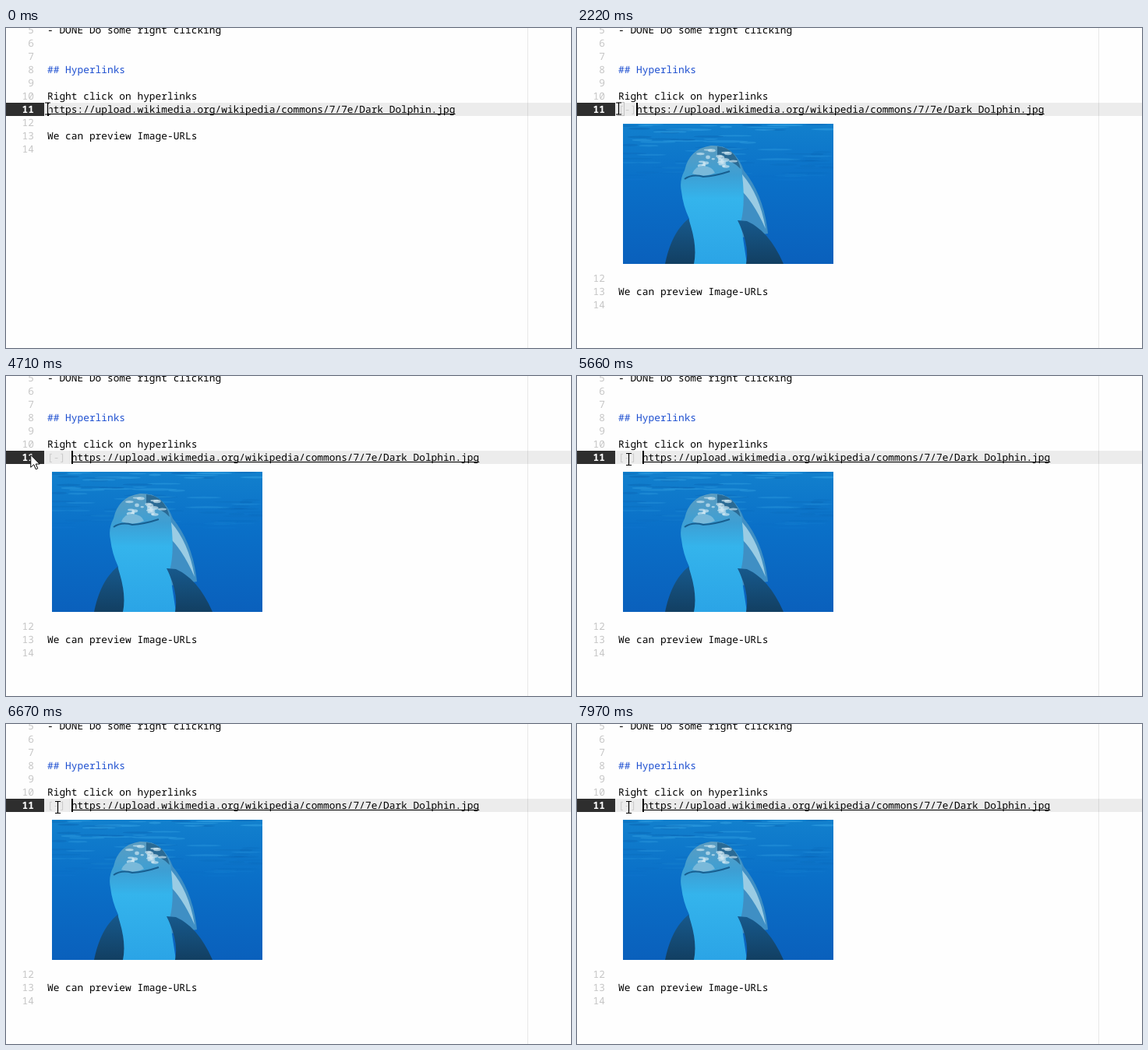
Recreate the animation shown at these times as an HTML page. Size 725x411 px, loop 8000 ms.

```html
<!DOCTYPE html>
<html lang="en">
<head>
<meta charset="utf-8">
<title>Image link preview</title>
<style>
  html, body { margin: 0; width: 100%; height: 100%; overflow: hidden; background: #fefefe; }
  svg { display: block; width: 725px; height: 411px; }
  text {
    font: 12.83px "Noto Sans Mono", "DejaVu Sans Mono", monospace;
    text-rendering: geometricPrecision; white-space: pre; fill: #000;
  }
  .num { fill: #c6c6c6; text-anchor: end; }
  .now { fill: #fff; font-weight: bold; }
  .head { fill: #1d4fd0; }
</style>
</head>
<body>
<svg viewBox="0 0 725 411">
  <defs>
    <linearGradient id="sea" x2="0" y2="1">
      <stop offset="0" stop-color="#1280cd"/>
      <stop offset=".4" stop-color="#0a70c8"/>
      <stop offset="1" stop-color="#0a60bc"/>
    </linearGradient>
    <linearGradient id="skin" x2="0" y2="1">
      <stop offset="0" stop-color="#5c9cc0"/>
      <stop offset=".25" stop-color="#3d9fd4"/>
      <stop offset=".45" stop-color="#34b4ec"/>
      <stop offset="1" stop-color="#2ba4e6"/>
    </linearGradient>
    <linearGradient id="fin" x2="0" y2="1">
      <stop offset="0" stop-color="#17598c"/>
      <stop offset="1" stop-color="#123f62"/>
    </linearGradient>
    <clipPath id="frame"><rect x="59" y="123" width="270" height="180"/></clipPath>
  </defs>

  <rect x="669" width="1" height="411" fill="#e8e8e8"/>
  <rect x="49" y="96" width="676" height="17" fill-opacity=".07"/>
  <rect y="96" width="49" height="17" fill="#2e2e2e"/>

  <g id="top"></g>
  <g id="below"></g>

  <text id="prefix" x="53" y="109"></text>
  <g id="link">
    <text x="53" y="109">https://upload.wikimedia.org/wikipedia/commons/7/7e/Dark_Dolphin.jpg</text>
    <rect x="53" y="110" width="523.5" height="1"/>
  </g>
  <rect id="match" x="52.5" y="95.5" width="8" height="17" fill="none" stroke="#c0c0c0"/>
  <rect id="caret" y="96" width="2" height="17"/>

  <g id="photo" clip-path="url(#frame)">
    <rect x="59" y="123" width="270" height="180" fill="url(#sea)"/>
    <g id="waves"></g>
    <path d="M186 152Q206 160 214 183Q240 215 245 264L205 270Z" fill="#3f8fc4"/>
    <path d="M212 188Q235 215 242 258Q226 222 208 206Z" fill="#9accE4"/>
    <path d="M134 210Q131 196 138 183Q144 155 172 151Q202 150 211 180Q217 225 210 250L218 303H148L144 245Q136 228 134 210Z" fill="url(#skin)"/>
    <path d="M180 152Q204 154 210 181Q200 170 180 166Z" fill="#2a6a94"/>
    <g id="glints"></g>
    <path d="M148 187Q152 177 162 177Q174 178 177 186Q162 193 148 187Z" fill="#79b9da"/>
    <path d="M138 194Q148 187 162 191Q178 190 196 184" fill="none" stroke="#185f90" stroke-width="2"/>
    <path d="M143 245Q121 263 113 303H150Q155 279 143 245Z" fill="url(#fin)"/>
    <path d="M206 247Q222 279 217 303H265Q247 261 218 248Z" fill="url(#fin)"/>
  </g>

  <g id="mouse">
    <path id="arrow" d="M0 0V16L4 12.5L6.5 18.5L9 17.5L6.5 11.8H11.5Z" fill="#fff" stroke="#000"/>
    <g id="beam" fill="none">
      <path d="M0-6V6" stroke="#eee" stroke-width="4"/>
      <path d="M-3.5-7.5H3.5M0-7V7M-3.5 7.5H3.5" stroke="#000" stroke-width="1.2"/>
    </g>
  </g>
</svg>
<script>
const $ = id => document.getElementById(id);
const LOOP = 8000, CHAR = 7.698, LEFT = 53;
const TYPED = "[-] ";
const keys = [980, 1610, 2220, 2620];
const clicks = [5810, 6670, 7280, 7970];
const BLINK = 1005, LIT = 613;

const lines = {
  5: "- DONE Do some right clicking",
  8: "## Hyperlinks",
  10: "Right click on hyperlinks",
  13: "We can preview Image-URLs"
};

function addText(parent, x, y, str, cls) {
  const el = document.createElementNS("http://www.w3.org/2000/svg", "text");
  el.setAttribute("x", x);
  el.setAttribute("y", y);
  el.setAttribute("class", cls);
  el.textContent = str;
  parent.append(el);
}

for (let n = 5; n <= 14; n++) {
  const group = n > 11 ? $("below") : $("top"), y = 109 + 17 * (n - 11);
  addText(group, 36, y, n, n === 11 ? "num now" : "num");
  if (lines[n]) addText(group, LEFT, y, lines[n], n === 8 ? "head" : "");
}

let seed = 7;
const rand = () => (seed = seed * 16807 % 2147483647) / 2147483647;
const blob = (x, y, rx, ry, fill, alpha) =>
  `<ellipse cx="${x}" cy="${y}" rx="${rx}" ry="${ry}" fill="${fill}" opacity="${alpha}"/>`;

// Flat light and dark ripples, fading with depth
let waves = "", glints = "";
for (let i = 0; i < 90; i++) {
  const depth = rand() ** 1.5;
  waves += blob(59 + 270 * rand(), 124 + 75 * depth, 8 + 22 * rand(), .6 + rand(),
    i % 2 ? "#3aa8e6" : "#0860ae", .5 * (1 - depth));
}
// Sunlight on the forehead
for (let i = 0; i < 22; i++) {
  const a = Math.PI * (1.1 + .8 * rand()), r = .4 + .5 * rand();
  glints += blob(175 + 34 * r * Math.cos(a), 183 + 32 * r * Math.sin(a), 2 + 4 * rand(), 1 + 2 * rand(), "#d6ebf4", .65);
}
$("waves").innerHTML = waves;
$("glints").innerHTML = glints;

const show = (id, on) => $(id).setAttribute("visibility", on ? "visible" : "hidden");
const move = (id, x, y) => $(id).setAttribute("transform", `translate(${x} ${y})`);
const ramp = (t, from, to) => Math.min(1, Math.max(0, (t - from) / (to - from)));
const passed = (times, t) => times.filter(time => time <= t).length;

// Out to the gutter, then back along a sagging arc, sampled every 78 ms
function pointer(t) {
  const step = 4640 + 78 * Math.floor((t - 4640) / 78);
  const out = ramp(step, 4562, 4718), p = ramp(step, 4800, 5350);
  const back = p * p * (3 - 2 * p);
  return [53.5 - 43.5 * out + 56.5 * back, 103.5 - 4.5 * out + 8 * back + 6 * Math.sin(Math.PI * back)];
}

function draw(t) {
  const prefix = TYPED.slice(0, passed(keys, t)), shift = prefix.length * CHAR;
  const open = (prefix.length > 2) !== (passed(clicks, t) % 2 === 1);
  // Every key or click restarts the blink
  const last = Math.max(-393, ...[...keys, ...clicks].filter(time => time <= t));
  const [x, y] = pointer(t);

  $("prefix").textContent = prefix;
  $("prefix").style.fill = prefix.length > 2 ? "#ccc" : "#222";
  move("link", shift, 0);
  $("caret").setAttribute("x", Math.round(LEFT + shift));
  show("caret", (t - last) % BLINK < LIT);
  show("match", prefix === "[-]");
  show("photo", open);
  move("below", 0, open ? 200 : 0);
  move("mouse", x, y);
  show("arrow", x < 49);
  show("beam", x >= 49);
}

function tick() {
  draw(performance.now() % LOOP);
  requestAnimationFrame(tick);
}
tick();
</script>
</body>
</html>
```
